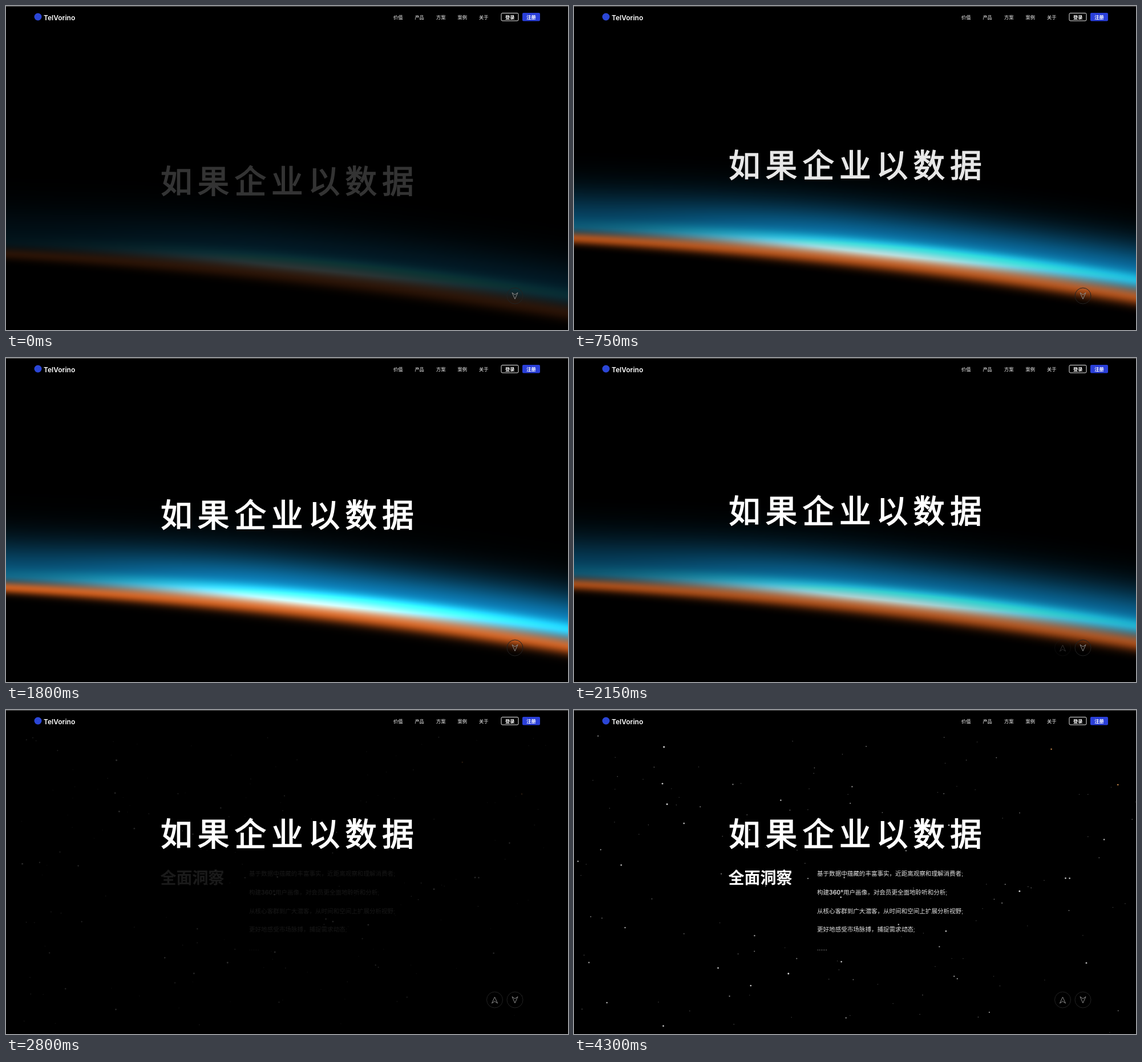
These frames come from a looping animation (985x569 px, 4350 ms). An HTML page with a canvas:

```html
<!DOCTYPE html>
<html lang="zh-CN">
<head>
<meta charset="utf-8">
<title>TelVorino</title>
<style>
  html, body { margin: 0; width: 100%; height: 100%; overflow: hidden; background: #000; }
  canvas, svg { position: absolute; left: 0; top: 0; width: 985px; height: 569px; display: block; }
  text { font-family: "Noto Sans CJK SC", "Noto Sans CJK", "Noto Sans SC", sans-serif; fill: #fff; white-space: pre; }
  #title { font-size: 55.5px; font-weight: 400; letter-spacing: 9.2px; stroke: #fff; stroke-width: 1.6px; }
  #copy .head { font-size: 28px; font-weight: 700; }
  #copy .line { font-family: Inter, "Noto Sans CJK SC", "Noto Sans CJK", sans-serif; font-size: 10.55px; font-weight: 300; fill: #e2e2e2; }
  #copy .num { font-weight: 500; fill: #fff; }
  .nav text { font-size: 8.2px; font-weight: 500; }
  .nav .button { font-weight: 700; }
  .nav .brand { font-family: Inter, sans-serif; font-size: 12px; font-weight: 600; }
  .arrow { fill: none; stroke: #8c8c8c; stroke-linejoin: round; }
  .arrow circle { stroke: #222; }
</style>
</head>
<body>
<canvas id="glow" width="985" height="569"></canvas>
<canvas id="stars" width="985" height="569"></canvas>
<svg viewBox="0 0 985 569">
  <text id="title" x="271" y="295.5">如果企业以数据</text>
  <g id="copy">
    <text class="head" x="270.5" y="304.5">全面洞察</text>
    <text class="line" x="426" y="291">基于数据中蕴藏的丰富事实，近距离观察和理解消费者;</text>
    <text class="line" x="426" y="323.8">构建<tspan class="num">360°</tspan>用户画像，对会员更全面地聆听和分析;</text>
    <text class="line" x="426" y="356.5">从核心客群到广大潜客，从时间和空间上扩展分析视野;</text>
    <text class="line" x="426" y="389.3">更好地感受市场脉搏，捕捉需求动态;</text>
    <text class="line" x="426" y="422">......</text>
  </g>
  <g id="up" class="arrow">
    <circle cx="856.5" cy="509" r="14"/>
    <path d="M851.5 515L856.5 504L861.5 515L856.5 511.5Z"/>
  </g>
  <g class="arrow">
    <circle cx="892" cy="509" r="14"/>
    <path d="M887 503.5L892 514.5L897 503.5L892 507Z"/>
  </g>
  <g class="nav">
    <rect width="985" height="38"/>
    <rect width="985" height="1" fill="#5c5c5c"/>
    <circle cx="56" cy="19" r="6.5" fill="#2b46d6"/>
    <text class="brand" x="66" y="25">TelVorino</text>
    <text x="679" y="22.6">价值</text>
    <text x="716.4" y="22.6">产品</text>
    <text x="754" y="22.6">方案</text>
    <text x="791.5" y="22.6">案例</text>
    <text x="829" y="22.6">关于</text>
    <rect x="868" y="12.5" width="30" height="13.5" rx="2" fill="none" stroke="#e8e8e8"/>
    <text class="button" x="875" y="22.6">登录</text>
    <rect x="905" y="12" width="31" height="14.5" rx="2" fill="#2a3fd8"/>
    <text class="button" x="912.3" y="22.6">注册</text>
  </g>
</svg>
<script>
const W = 985, H = 569, LOOP = 4350, STEP = 50;
const $ = id => document.getElementById(id);
const bell = (v, centre, width) => Math.exp(-(((v - centre) / width) ** 2));
const ramp = (t, from, to) => Math.min(1, Math.max(0, (t - from) / (to - from)));
const smooth = u => u * u * (3 - 2 * u);

// Horizon: blue haze, cyan rim, white band and orange band, added up.
function drawGlow() {
  const c = $('glow').getContext('2d');
  const image = c.createImageData(W, H);
  for (let x = 0; x < W; x++) {
    const edge = 382 + 0.034 * x + 0.0000625 * x * x;
    const thick = 1 - 0.3 * (1 - x / W) ** 2;
    const cyanHere = bell(x, 700, 520), whiteHere = bell(x, 540, 330);
    const hazeHere = 0.6 + 0.4 * smooth(ramp(x, 0, 500));
    for (let y = 0; y < H; y++) {
      const d = y < edge ? y - edge : (y - edge) / thick;
      const haze = bell(d, 0, d < 0 ? 62 : 20) * hazeHere;
      const cyan = bell(d, -2, 12) * cyanHere;
      const white = bell(d, 12, 12) * whiteHere;
      const fire = bell(d, 30, 15);
      image.data.set([
        14 * haze + 20 * cyan + 150 * white + 195 * fire,
        140 * haze + 95 * cyan + 120 * white + 82 * fire,
        205 * haze + 65 * cyan + 95 * white + 18 * fire,
        255
      ], (y * W + x) * 4);
    }
  }
  c.putImageData(image, 0, 0);
}

// Stars: many faint, few bright, denser towards the left.
let seed = 71;
const rand = () => (seed = seed * 16807 % 2147483647) / 2147483647;
const sky = Array.from({ length: 190 }, () => {
  const power = rand() ** 3;
  return {
    x: W * rand() ** 1.2,
    y: H * rand(),
    r: 0.7 + 0.8 * power,
    alpha: 0.3 + 0.65 * power,
    rgb: '230,230,230'
  };
});
for (const [x, y] of [[817, 81], [927, 140]]) sky.push({ x, y, r: 1.3, alpha: 0.9, rgb: '205,140,75' });

const starCtx = $('stars').getContext('2d');
function drawStars(zoom, fade) {
  starCtx.clearRect(0, 0, W, H);
  if (!fade) return;
  for (const s of sky) {
    starCtx.fillStyle = `rgba(${s.rgb},${s.alpha * fade})`;
    starCtx.beginPath();
    starCtx.arc(493 + (s.x - 493) * zoom, 284 + (s.y - 284) * zoom, s.r, 0, 7);
    starCtx.fill();
  }
}

function pose(t) {
  const shift = 32 * (1 - ramp(t, 0, 1000)) ** 1.4 - 58 * smooth(ramp(t, 2000, 2750));
  const fades = {
    title: 0.2 + 0.8 * ramp(t, 0, 850),
    glow: (0.2 + 0.8 * ramp(t, 0, 900)) * (1 - ramp(t, 2000, 2800)),
    up: ramp(t, 2050, 2350),
    copy: ramp(t, 2750, 3250)
  };
  $('title').setAttribute('transform', `translate(0 ${shift})`);
  $('glow').style.transform = `translateY(${shift}px)`;
  for (const id in fades) $(id).style.opacity = fades[id];
  drawStars(1 + 0.0605 * (t - 3500) / 800, ramp(t, 2700, 3200));
}

const start = performance.now();
function tick() {
  const t = Math.max(0, performance.now() - start) % LOOP;
  pose(Math.floor(t / STEP) * STEP);
  requestAnimationFrame(tick);
}

drawGlow();
tick();
</script>
</body>
</html>
```
